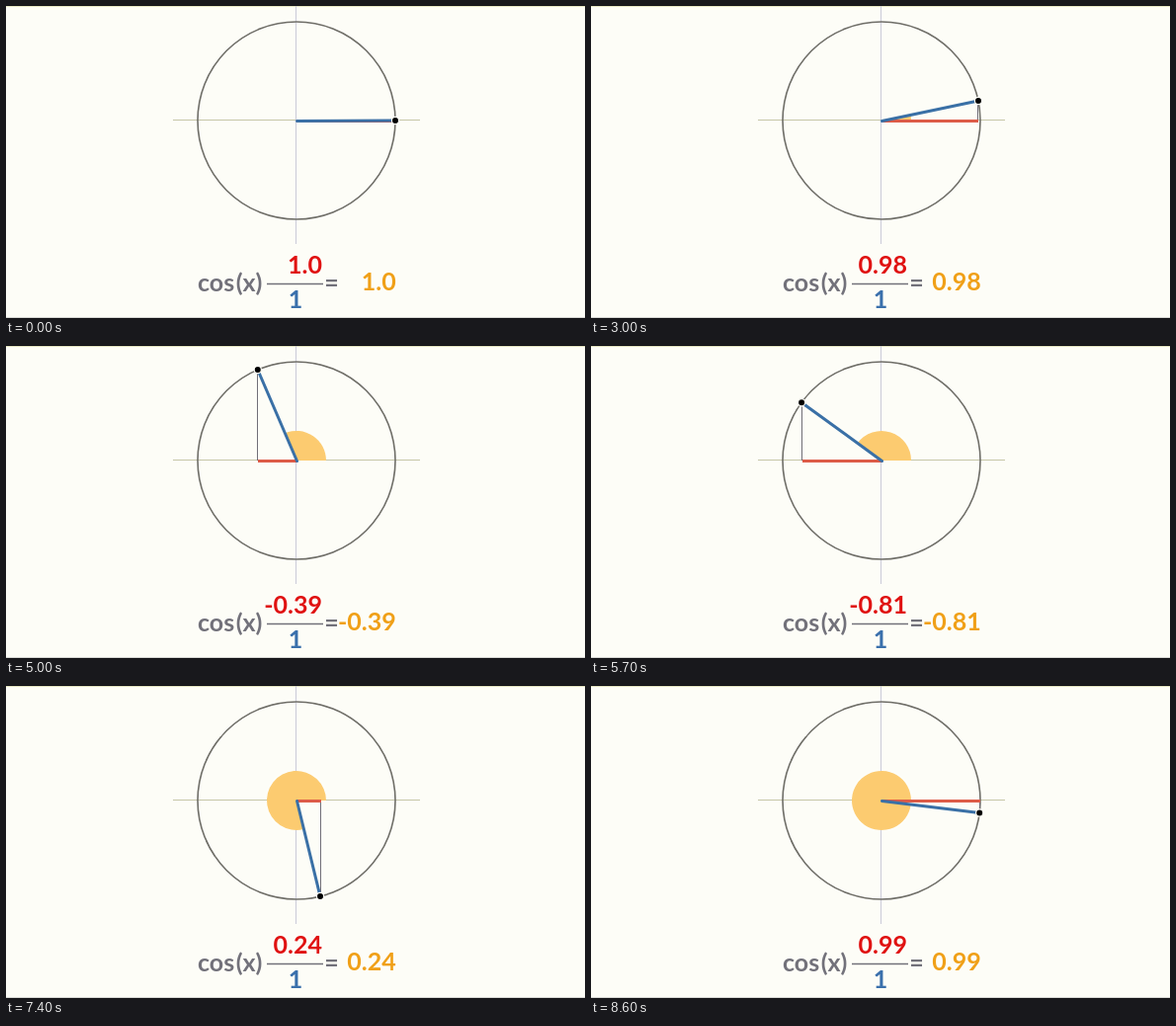
Animation, 586 px wide and 316 px high, one loop 8700 ms. Source, as an HTML page:

```html
<!DOCTYPE html>
<html lang="en">
<head>
<meta charset="utf-8">
<title>Cosine on the unit circle</title>
<style>
  html, body { margin: 0; width: 100%; height: 100%; overflow: hidden; background: #fdfdf7; }
  svg { display: block; width: 100%; height: 100%; }
  text { font: 700 25px Lato, sans-serif; }
  .end { text-anchor: end; }
  .mid { text-anchor: middle; }
</style>
</head>
<body>
<svg viewBox="0 0 586 316">
  <path d="M0 .5H586" stroke="#ececc8"/>
  <path d="M0 315.5H586" stroke="#dcdcd8"/>
  <path d="M169 115.5H419" stroke="#c6c6a8"/>
  <path d="M293.5 0V241" stroke="#cbcbd8"/>
  <circle cx="294" cy="116" r="100" fill="none" stroke="#6f6e68" stroke-width="1.6"/>
  <path id="sector" fill="#fccb70"/>
  <path id="drop" stroke="#716f78" shape-rendering="crispEdges"/>
  <path id="base" stroke="#dd5c48" stroke-width="3"/>
  <path id="radius" stroke="#3a70a6" stroke-width="3" stroke-linecap="round"/>
  <circle id="dot" r="3.6" stroke="#fdfdf7" stroke-width="1.2"/>

  <text x="194" y="289" fill="#72717a">cos<tspan dx="1.5">(x)</tspan></text>
  <path d="M264 281.5H321" stroke="#72717a" stroke-width="1.6"/>
  <text id="top" class="end" x="320" y="271" fill="#e01212"></text>
  <text class="mid" x="293" y="306" fill="#3a70ac">1</text>
  <text class="mid" x="329.5" y="289" fill="#72717a">=</text>
  <text id="result" class="end" x="394.7" y="288" fill="#f0a018"></text>
</svg>
<script>
const LOOP = 8700, STEP = 100;
const CX = 294, CY = 116, R = 100, ARC = 30;
const $ = id => document.getElementById(id);

// Hand-dragged angle: [ms, degrees]
const keys = [
  [0, 0], [2500, 0], [3000, 11.5], [3900, 55.9], [5000, 113.1],
  [5400, 126], [6500, 210.7], [7400, 283.9], [8600, 352.8], [8700, 355]
];

const slopes = keys.slice(1).map(([t, v], i) => (v - keys[i][1]) / (t - keys[i][0]));

// Harmonic mean keeps the curve monotone
function tangent(i) {
  const a = slopes[i - 1], b = slopes[i];
  if (a === undefined) return b;
  if (b === undefined) return a;
  return a * b > 0 ? 2 * a * b / (a + b) : 0;
}

function angleAt(t) {
  let i = 0;
  while (i < keys.length - 2 && t >= keys[i + 1][0]) i++;
  const [t0, v0] = keys[i], [t1, v1] = keys[i + 1];
  const h = t1 - t0, u = (t - t0) / h, w = 1 - u;
  return v0 * (1 + 2 * u) * w * w + v1 * u * u * (3 - 2 * u)
    + h * u * w * (tangent(i) * w - tangent(i + 1) * u);
}

function label(v) {
  const n = Math.round(v * 100) / 100 || 0;
  return Number.isInteger(n) ? n.toFixed(1) : String(n);
}

function draw(t) {
  const deg = angleAt(t), a = deg * Math.PI / 180;
  const c = Math.cos(a), s = Math.sin(a);
  const x = CX + R * c, y = CY - R * s;
  const dropX = Math.floor(x) + .5;

  $('sector').setAttribute('d', deg > 0
    ? `M${CX} ${CY}h${ARC}A${ARC} ${ARC} 0 ${deg > 180 ? 1 : 0} 0 ${CX + ARC * c} ${CY - ARC * s}Z`
    : '');
  $('drop').setAttribute('d', `M${dropX} ${y}V${CY}`);
  $('base').setAttribute('d', `M${CX} ${CY + .5}H${dropX + .5}`);
  $('radius').setAttribute('d', `M${CX + .5} ${CY + .5}L${x} ${y}`);
  $('dot').setAttribute('cx', x);
  $('dot').setAttribute('cy', y);
  $('top').textContent = $('result').textContent = label(c);
}

const start = performance.now();
function tick() {
  const t = (performance.now() - start) % LOOP;
  draw(Math.floor(t / STEP) * STEP);
  requestAnimationFrame(tick);
}
tick();
</script>
</body>
</html>
```
